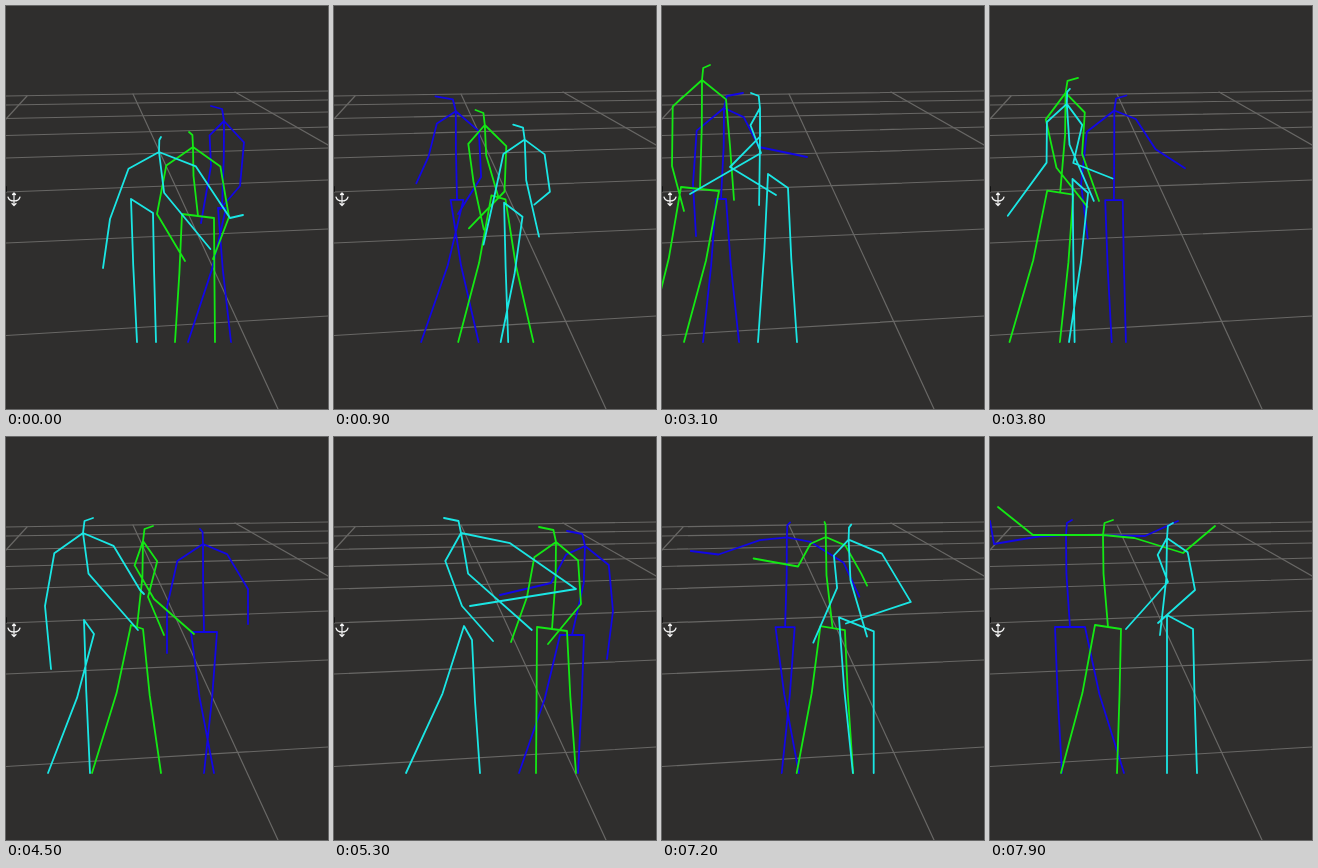
Write an HTML page that moves like this. It is 322x403 px and loops after 8 s.

```html
<!DOCTYPE html>
<html lang="en">
<head>
<meta charset="utf-8">
<title>Three dancing skeletons</title>
<style>
html, body { margin: 0; width: 100%; height: 100%; overflow: hidden; background: #2f2e2d; }
svg { display: block; width: 322px; height: 403px; }
path { fill: none; stroke-linejoin: round; stroke-linecap: round; }
.grid { stroke: #686765; stroke-width: 1.2; }
.body { stroke-width: 1.8; }
.cursor { stroke: #f4f4f4; stroke-width: 1.2; }
</style>
</head>
<body>
<svg viewBox="0 0 322 403">
  <path class="grid" d="M0 90L322 85M0 99L322 94M0 112.5L322 106M0 129.5L322 121M0 152L322 142M0 186L322 174M0 237L322 223M0 329.5L322 310"/>
  <path class="grid" d="M21 90L0 113M127 88L272 403M229 86L322 139"/>
  <g id="dancers"></g>
  <path d="M0 181v4" stroke="#111" stroke-width="2"/>
  <path class="cursor" d="M8 187v12M6.500 188.500L8 187L9.500 188.500M6 197.500L8 199.500L10 197.500M2 191Q3 195 8 195Q13 195 14 191"/>
</svg>
<script>
const LOOP = 8000, STEP = 100, FLOOR = 336;
const layer = document.getElementById('dancers');
const mix = (a, b, u) => a + (b - a) * u;

function dancer(color, tilt, lean) {
  const path = document.createElementNS('http://www.w3.org/2000/svg', 'path');
  path.setAttribute('class', 'body');
  path.setAttribute('stroke', color);
  layer.append(path);
  const self = {
    path, tilt, lean, keys: [],
    // look, neck, left elbow and hand, right elbow and hand, hips (x, y, half width), feet x
    pose(time, look, ...parts) {
      self.keys.push({ time, values: [look, ...parts.flat()] });
      return self;
    }
  };
  return self;
}

const blue = dancer('#1206e6', 0)
  .pose(0, -13, [218, 115], [205, 160, 195, 217], [234, 180, 214, 203], [216, 202, 4], [225, 182])
  .pose(1800, -21, [46, 98], [8, 147, -4, 155], [79, 161, 62, 205], [49, 188, 8], [75, 18])
  .pose(3100, 19, [62, 102], [31, 178, 34, 230], [97, 141, 145, 151], [59, 193, 5], [41, 77])
  .pose(4500, -3, [197, 107], [161, 170, 161, 216], [242, 152, 242, 187], [198, 195, 13], [208, 198])
  .pose(5300, -18, [251, 109], [217, 146, 166, 158], [279, 174, 273, 222], [238, 198, 12], [185, 244])
  .pose(6500, -1, [173, 103], [111, 128, 64, 140], [211, 150, 212, 220], [166, 191, 6], [188, 123])
  .pose(7900, 6, [76, 98], [4, 107, 0, 84], [155, 99, 188, 84], [80, 190, 15], [72, 134]);

const green = dancer('#14e814', 2)
  .pose(0, -4, [187, 141], [151, 208, 179, 255], [223, 211, 207, 253], [192, 210, 16], [169, 209])
  .pose(1800, -11, [112, 98], [116, 150, 114, 199], [121, 162, 76, 197], [130, 177, 2], [76, 172])
  .pose(3100, 8, [40, 74], [10, 160, 22, 205], [68, 140, 72, 194], [38, 183, 19], [-14, 22])
  .pose(4500, 10, [137, 104], [148, 162, 188, 197], [142, 160, 158, 198], [131, 190, 6], [86, 155])
  .pose(5300, -17, [222, 105], [193, 160, 177, 205], [247, 167, 214, 207], [218, 192, 15], [202, 242])
  .pose(6500, -11, [206, 102], [208, 155, 160, 167], [209, 155, 192, 197], [213, 192, 12], [187, 242])
  .pose(7900, 10, [113, 98], [43, 98, 8, 70], [193, 116, 225, 89], [118, 190, 13], [71, 127]);

// This dancer's back swings free of the hips
const swing = t => 27 + 44 * Math.cos(2 * Math.PI * (t - 5400) / 6400);
const cyan = dancer('#1ae6e4', 7, swing)
  .pose(0, 2, [153, 146], [104, 213, 97, 262], [224, 212, 237, 209], [136, 200, 11], [131, 150])
  .pose(1800, -21, [207, 121], [195, 163, 173, 216], [193, 164, 164, 190], [203, 203, 8], [196, 175])
  .pose(3100, -9, [98, 102], [99, 147, 28, 188], [68, 161, 114, 189], [116, 175, 10], [96, 135])
  .pose(4500, 10, [77, 96], [39, 169, 45, 232], [134, 153, 138, 157], [83, 190, 5], [84, 42])
  .pose(5300, -17, [127, 96], [128, 169, 159, 204], [242, 152, 136, 169], [134, 196, 4], [72, 146])
  .pose(6500, -2, [187, 103], [168, 157, 163, 215], [279, 172, 190, 185], [191, 190, 19], [188, 208])
  .pose(7900, 6, [177, 101], [178, 145, 136, 192], [205, 153, 168, 186], [190, 185, 13], [177, 207]);

// Hermite curve through the key poses, with uneven spacing in time
function poseAt(keys, t) {
  const last = keys.length - 1;
  let i = 0;
  while (i < last - 1 && t >= keys[i + 1].time) i++;
  const a = keys[i], b = keys[i + 1];
  const before = keys[Math.max(0, i - 1)], after = keys[Math.min(last, i + 2)];
  const span = b.time - a.time, u = Math.min(1, (t - a.time) / span);
  const u2 = u * u, u3 = u2 * u;
  return a.values.map((p, k) => {
    const q = b.values[k];
    const v = (q - before.values[k]) / (b.time - before.time) * span;
    const w = (after.values[k] - p) / (after.time - a.time) * span;
    return (2 * u3 - 3 * u2 + 1) * p + (u3 - 2 * u2 + u) * v
      + (3 * u2 - 2 * u3) * q + (u3 - u2) * w;
  });
}

// The shoulder sits outside the line from neck to elbow, most when the arm hangs down
function arm(neck, ex, ey, hx, hy, side) {
  const dx = ex - neck[0], dy = ey - neck[1];
  const out = side * 0.22 * dy / Math.hypot(dx, dy, 1);
  const shoulder = [neck[0] + 0.38 * dx + out * dy, neck[1] + 0.38 * dy - out * dx];
  return [neck, shoulder, [ex, ey], [hx, hy]];
}

// The thigh hangs steeper than the shin
function leg(hip, foot) {
  const knee = [mix(hip[0], foot, 0.37), mix(hip[1], FLOOR, 0.46)];
  return [hip, knee, [foot, FLOOR]];
}

function skeleton({ keys, tilt, lean }, t) {
  const [look, nx, ny, lex, ley, lhx, lhy, rex, rey, rhx, rhy,
    hipX, hipY, half, footL, footR] = poseAt(keys, t);
  const neck = [nx, ny];
  const tail = lean ? [nx + lean(t), ny + 97] : [hipX, hipY];
  const hipL = [hipX - half, hipY - tilt], hipR = [hipX + half, hipY + tilt];
  return [
    [[nx + look, ny - 15], [nx + look * 0.15, ny - 12], neck],
    arm(neck, lex, ley, lhx, lhy, -1),
    arm(neck, rex, rey, rhx, rhy, 1),
    [neck, [mix(nx, tail[0], 0.1), mix(ny, tail[1], 0.42)], tail],
    [...leg(hipL, footL).reverse(), ...leg(hipR, footR)]
  ];
}

function draw(t) {
  for (const d of [blue, green, cyan]) {
    const chain = points => 'M' + points.map(p => p.map(n => n.toFixed(1)).join(' ')).join('L');
    d.path.setAttribute('d', skeleton(d, t).map(chain).join(''));
  }
}

const start = performance.now();
function tick() {
  const t = (performance.now() - start) % LOOP;
  draw(Math.floor(t / STEP) * STEP);
  requestAnimationFrame(tick);
}
draw(0);
requestAnimationFrame(tick);
</script>
</body>
</html>
```
